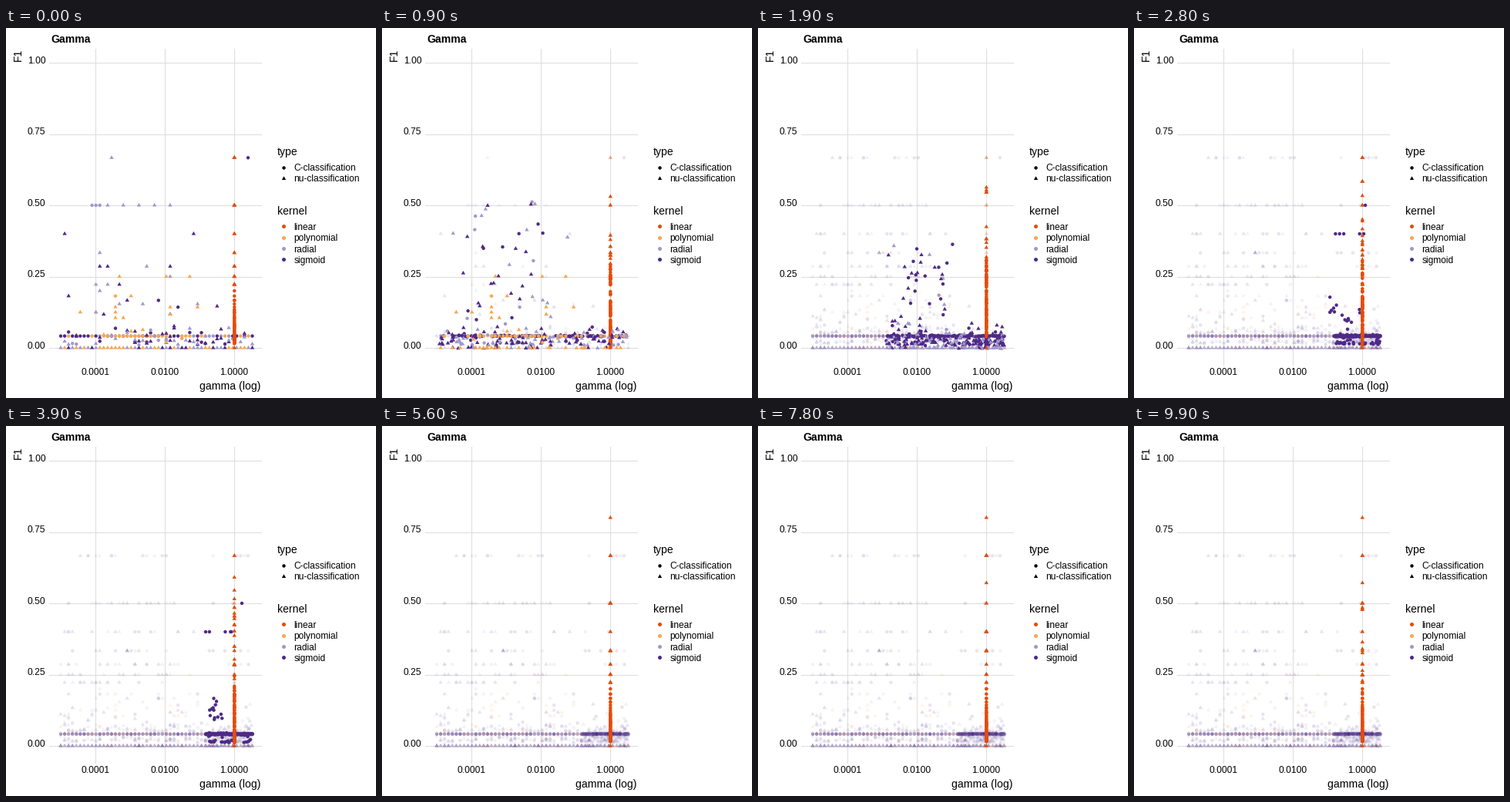
A matplotlib script for the animation above (10 s loop, 480x480 px).

```python
import numpy as np
import matplotlib.pyplot as plt
from matplotlib.animation import FuncAnimation

PX = 0.75  # points per pixel at 96 dpi
plt.rcParams["font.family"] = "Liberation Sans"
COLORS = np.array([[226, 77, 10], [251, 166, 80], [160, 154, 203], [78, 42, 135]]) / 255
LINEAR, POLY, RADIAL, SIGMOID = range(4)
DOT, TRI = 0, 1
SHADOW_ALPHA = 0.13
STATES = [11 * k + (k > 2) for k in range(10)]
REST = 46  # the middle state is held for one more frame
GRID = np.linspace(71, 319.5, 50)
ONE = 296.3  # x of gamma = 1
rng = np.random.default_rng(7)


def f1_y(score):
    return 415 - 370 * np.asarray(score, float)


ROW = f1_y(1 / 24)


def cloud(x, y, kernel, shape):
    """Rows of x, y, kernel, shape."""
    return np.column_stack(np.broadcast_arrays(np.atleast_1d(x), y, kernel, shape)).astype(float)


def kernels(n, poly, radial):
    return rng.choice([POLY, RADIAL, SIGMOID], n, p=[poly, radial, 1 - poly - radial])


def snap(x):
    """Move to the nearest step of the gamma grid."""
    return GRID[np.abs(np.subtract.outer(x, GRID)).argmin(axis=1)]


def spread(n, left, scale, poly, radial, tri):
    """Low scores trailing upwards from the bottom."""
    y = 411 - np.minimum(rng.exponential(scale, n), 50)
    return cloud(rng.uniform(left, 320, n), y, kernels(n, poly, radial), rng.random(n) < tri)


def row(n, left, y, poly, radial, shape):
    return cloud(rng.uniform(left, 320, n), y + rng.normal(0, 0.6, n), kernels(n, poly, radial), shape)


def grid_rows(poly, radial, copies=1):
    n = 50 * copies
    x = np.tile(GRID, copies)
    return np.vstack([cloud(x, f1_y(0), kernels(n, poly, radial + 0.25), TRI),
                      cloud(x, ROW, kernels(n, poly, radial), DOT)])


def levels(n, left, right, best, worst, poly, radial, tri):
    """Scores of 2/m for whole m, at steps of the gamma grid."""
    return cloud(snap(rng.uniform(left, right, n)), f1_y(2 / rng.integers(best, worst, n)),
                 kernels(n, poly, radial), rng.random(n) < tri)


def plume(n, center, width, top, radial, tri):
    """High scores around one gamma, thinning out upwards."""
    x = np.clip(rng.normal(center, width, n), 71, 319)
    y = f1_y(0.09 + (top - 0.09) * rng.random(n) ** 1.5)
    return cloud(x, y, kernels(n, 0, radial), rng.random(n) < tri)


def first_state():
    """A coarse sweep over every gamma with all kernels."""
    low = spread(75, 71, 9, 0.12, 0.3, 0.8)
    low[:, 0] = snap(low[:, 0])
    return np.vstack([
        low, grid_rows(0.35, 0.2),
        cloud(GRID[12:26], ROW, kernels(14, 0.8, 0.1), DOT),
        cloud([137, 314], f1_y(2 / 3), [RADIAL, SIGMOID], [TRI, DOT]),
        cloud(GRID[8:11], f1_y(0.5), RADIAL, DOT),
        cloud(GRID[12:29:4], f1_y(0.5), RADIAL, TRI),
        levels(14, 71, 260, 5, 10, 0.1, 0.5, 1),
        levels(22, 71, 260, 10, 20, 0.45, 0.25, 0.8)])


def second_state():
    return np.vstack([
        spread(120, 71, 8, 0.03, 0.4, 0.7),
        row(110, 71, ROW, 0.05, 0.25, DOT), row(25, 71, 415, 0.2, 0.4, TRI),
        plume(42, 158, 36, 0.52, 0.45, 0.75)])


def second_marks():
    """The same sweep repeated, with many exact levels."""
    return np.vstack(
        [levels(13, 71, 222, m, m + 1, 0.05, 0.55, 0.6) for m in range(3, 10)]
        + [levels(80, 71, 250, 10, 40, 0.15, 0.55, 0.6),
           levels(110, 71, 320, 25, 120, 0.05, 0.6, 0.5),
           grid_rows(0.1, 0.25, copies=6)])


def third_state():
    return np.vstack([
        spread(210, 166, 7, 0, 0.3, 0.7),
        row(130, 166, ROW, 0, 0.12, DOT), row(45, 166, 415, 0.05, 0.75, TRI),
        plume(36, 215, 27, 0.36, 0.12, 0.65)])


def third_marks():
    """Larger gammas only."""
    return np.vstack([
        spread(150, 259, 10, 0, 0.7, 0.5),
        row(260, 259, ROW, 0, 0.1, DOT), row(40, 259, 415, 0, 0.6, TRI),
        levels(16, 259, 315, 3, 9, 0, 0.4, 0)])


def narrow_state():
    return np.vstack([
        spread(35, 259, 6, 0, 0, 0), row(170, 259, ROW, 0, 0, DOT),
        plume(14, 275, 10, 0.17, 0, 0),
        cloud(np.linspace(259, 302, 5), f1_y(0.4), SIGMOID, DOT),
        cloud(306, f1_y(0.5), SIGMOID, DOT)])


def linear_states():
    """Scores 2/m: a ladder that settles halfway, plus a few that keep wandering."""
    wanderers, high = 24, 9
    low = 2 / np.r_[10:30, 30:130:2]
    shapes = np.r_[np.full(wanderers + high, TRI), np.full(len(low), DOT), TRI]
    shapes[16:wanderers] = DOT
    states = []
    for k in range(10):
        best = 4 if k == 1 else 3
        loose = 2 / np.r_[rng.integers(best, 10, 16), rng.integers(10, 30, 8)]
        top = 2 / np.r_[2.5 if k > 3 else 3, 3.5 if k > 6 else 4, 3:10]
        rest = low
        if 0 < k < 4:
            top = 2 / rng.integers(best, 10, high)
            rest = 0.36 * rng.random(len(low)) ** 1.6
        states.append(cloud(ONE, f1_y(np.r_[loose, top, rest, 0]), LINEAR, shapes))
    return states, wanderers


def pair(ends, pool):
    """Pick for each end a nearby starting place in the previous state."""
    dx = np.abs(ends[:, None, 0] - pool[None, :, 0])
    dy = np.abs(ends[:, None, 1] - pool[None, :, 1])
    cost = dy + 0.3 * dx + rng.uniform(0, 30, dx.shape)
    return pool[cost.argmin(axis=1)]


linear, wanderers = linear_states()
empty = np.empty((0, 4))
first = first_state()
movers = [first, second_state(), third_state(), narrow_state(), narrow_state()]
extras = [empty, second_marks(), third_marks(), empty, empty]
full = [np.vstack(both) for both in zip(movers, extras)]
starts = [pair(movers[k + 1], full[k]) for k in range(4)]
marks = [np.vstack([first] + [linear[0][wanderers:]] * 2), extras[1], extras[2]]
still = first[first[:, 2] == POLY]


def blend(a, b, p):
    mixed = b.copy()
    mixed[:, :2] = a[:, :2] + (b[:, :2] - a[:, :2]) * p
    return mixed


def scene(frame):
    if frame == REST:
        frame -= 1
    k = int(np.searchsorted(STATES, frame, side="right")) - 1
    next_state = (STATES + [100])[k + 1]
    p = (frame - STATES[k]) / (next_state - STATES[k])
    live = [empty]
    if p == 0 and k < 5:
        live.append(full[k])
    elif k < 4:
        live.append(blend(starts[k], movers[k + 1], p))
        if k == 0:
            live.append(still)
    live.append(blend(linear[k], linear[k + 1], p))
    past = marks[:k + (p > 0)]
    return np.vstack([empty, *past]), np.vstack(live)


fig = plt.figure(figsize=(5, 5), dpi=96, facecolor="white")
ax = fig.add_axes([0, 0, 1, 1])
ax.set(xlim=(0, 480), ylim=(480, 0))
ax.axis("off")

TRIANGLE = [(0, 1.555), (-1.347, -0.778), (1.347, -0.778), (0, 1.555)]
MARKERS = [("o", (4.4 * PX) ** 2), (TRIANGLE, (6.3 * PX) ** 2)]


def text(x, y, s, size=12, **kw):
    ax.text(x, y, s, fontsize=size * PX, va="baseline", **kw)


def key(x, y, shape, color, scale=1.0):
    marker, size = MARKERS[shape]
    ax.scatter([x], [y], s=size * scale, marker=marker, color=[color], linewidths=0)


def grid_line(xs, ys):
    ax.plot(xs, ys, color="#dedede", lw=1.1 * PX, zorder=0)


for score in (0, 0.25, 0.5, 0.75, 1):
    y = f1_y(score) + 0.1
    grid_line([56, 330.5], [y, y])
    text(51.5, y + 0.7, f"{score:.2f}", ha="right")
for x, label in ((116.3, "0.0001"), (206.3, "0.0100"), (ONE, "1.0000")):
    grid_line([x, x], [27, 436.5])
    text(x - 0.6, 449.5, label, ha="center")
text(58.2, 19, "Gamma", 14, weight="bold")
text(330.5, 469, "gamma (log)", 14, ha="right")
text(21.5, 44, "F1", 14, rotation=90, ha="right", rotation_mode="default") if False else \
    ax.text(23, 27, "F1", fontsize=14 * PX, rotation=90, ha="right", va="top")
text(351.7, 165, "type", 14)
text(351.7, 242, "kernel", 14)
for i, label in enumerate(("C-classification", "nu-classification")):
    key(360, 180.7 + 14.4 * i, i, "black")
    text(373.4, 185 + 14.4 * i, label)
for i, label in enumerate(("linear", "polynomial", "radial", "sigmoid")):
    key(360, 257.2 + 14.4 * i, DOT, COLORS[i], 1.3)
    text(373.4, 262 + 14.4 * i, label)


def layer(z):
    return [ax.scatter([], [], s=size, marker=marker, linewidths=0, zorder=z + 0.1 * i)
            for i, (marker, size) in enumerate(MARKERS)]


shadow_layer, live_layer = layer(2), layer(3)


def fill(artists, points, alpha):
    for shape, artist in enumerate(artists):
        chosen = points[points[:, 3] == shape]
        rgb = COLORS[chosen[:, 2].astype(int)]
        artist.set_offsets(chosen[:, :2])
        artist.set_facecolors(np.column_stack([rgb, np.full(len(rgb), alpha)]))


def draw(frame):
    shadow, live = scene(frame)
    fill(shadow_layer, shadow, SHADOW_ALPHA)
    fill(live_layer, live, 1.0)
    return shadow_layer + live_layer


animation = FuncAnimation(fig, draw, frames=100, interval=100, repeat=True, repeat_delay=0)
plt.show()
```
